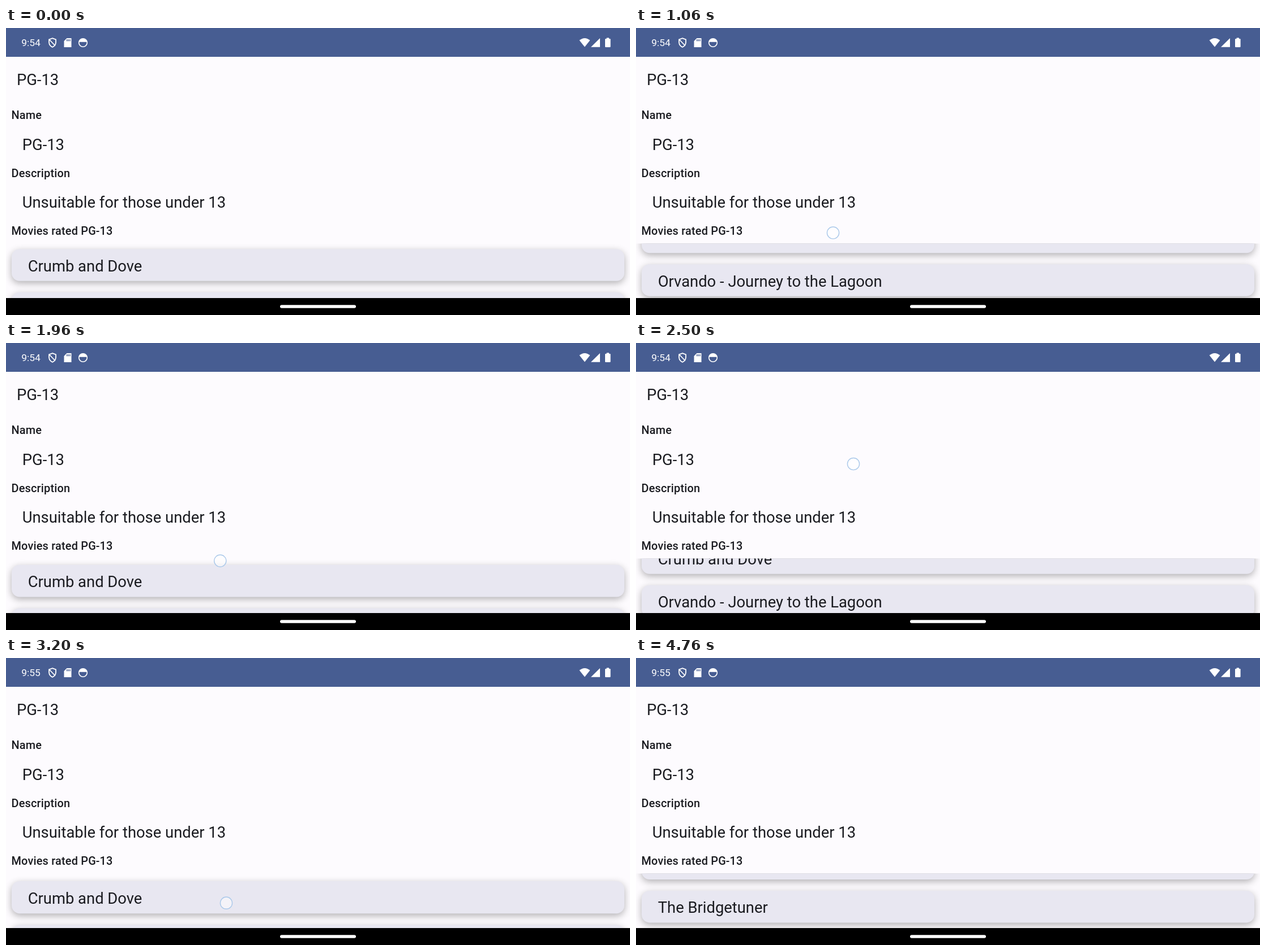
Write an HTML page with a canvas that moves like this. It is 1102 by 508 pixels and loops after 4.8 s.

```html
<!DOCTYPE html>
<html lang="en">
<head>
<meta charset="utf-8">
<title>Rating details</title>
<style>
  html, body { margin: 0; width: 100%; height: 100%; overflow: hidden; background: #fdfbfe; }
  canvas { display: block; width: 1102px; height: 508px; }
</style>
</head>
<body>
<canvas id="stage"></canvas>
<script>
const W = 1102, H = 508, LOOP = 4800;
const canvas = document.getElementById('stage');
const ctx = canvas.getContext('2d');
const dpr = window.devicePixelRatio || 1;
canvas.width = W * dpr;
canvas.height = H * dpr;

const INK = '#1a1b20', PAPER = '#fdfbfe', BAR = '#475d92', CARD = '#e8e7f1';
const LIST = { top: 381.4, bottom: 478 };
const ROW = { x: 10, w: 1082, h: 56.4, pitch: 76.3, top: 391.4 };
const MAX_SCROLL = 132;
const PRESS = 700, RELEASE = 4230, CLOCK_TICK = 2630;
const MOVIES = ['Crumb and Dove', 'Orvando - Journey to the Lagoon', 'The Bridgetuner'];

// Finger path: time, x, y
const PATH = [
  [700, 338, 432], [900, 342, 408], [1060, 348, 363], [1200, 353, 280],
  [1480, 364, 79], [1560, 366, 97], [1730, 371, 193], [1950, 378, 380],
  [2200, 383, 440], [2300, 384, 436], [2500, 384, 215], [2640, 386, 120],
  [2760, 387, 101], [2860, 387, 101], [3030, 389, 250], [3200, 389, 433],
  [3330, 389, 446], [3400, 389, 442], [3730, 389, 270], [3900, 389, 141],
  [4000, 389, 103], [4230, 389, 103]
];

// Drag legs: scroll = anchor - y; low/high weigh the pull past each end
const LEGS = [
  { end: 1480, anchor: 412, low: 1, high: 1 },
  { end: 2230, anchor: 312, low: 1, high: 2 },
  { end: 2810, anchor: 253, low: 0.68, high: 1 },
  { end: 3330, anchor: 243, low: 1, high: 2 },
  { end: Infinity, anchor: 340, low: 1.9, high: 1 }
];

const clamp = (v, lo, hi) => Math.min(hi, Math.max(lo, v));

// Slope at a path point, flat at turning points
function slope(i, k) {
  const a = PATH[i - 1], b = PATH[i], c = PATH[i + 1];
  if (!a || !c || (b[k] - a[k]) * (c[k] - b[k]) <= 0) return 0;
  return (c[k] - a[k]) / (c[0] - a[0]);
}

function along(t, k) {
  let i = 0;
  while (i < PATH.length - 2 && t > PATH[i + 1][0]) i++;
  const a = PATH[i], b = PATH[i + 1], d = b[0] - a[0];
  const u = clamp((t - a[0]) / d, 0, 1), v = 1 - u;
  return v * v * (1 + 2 * u) * a[k] + u * u * (3 - 2 * u) * b[k]
       + d * u * v * (v * slope(i, k) - u * slope(i + 1, k));
}

function listState(t) {
  if (t < PRESS) return { scroll: 0, pull: 0 };
  const leg = LEGS.find(l => t < l.end);
  const raw = leg.anchor - along(t, 2);
  const scroll = clamp(raw, 0, MAX_SCROLL);
  const over = raw - scroll;
  let pull = over * (over > 0 ? leg.high : leg.low) * 0.0185;
  if (t > RELEASE) pull *= Math.exp((RELEASE - t) / 120);
  return { scroll, pull };
}

function text(str, x, y, size, color = INK, weight = 400, spacing = 0) {
  ctx.font = `${weight} ${size}px Roboto, sans-serif`;
  ctx.letterSpacing = spacing + 'px';
  ctx.fillStyle = color;
  ctx.fillText(str, x, y);
}
const body = (str, x, y) => text(str, x, y, 27.4);
const label = (str, y) => text(str, 9.5, y, 19.9, INK, 500, 0.18);

function rounded(x, y, w, h, r) {
  ctx.beginPath();
  ctx.roundRect(x, y, w, h, r);
  ctx.fill();
}

function poly(...pts) {
  ctx.beginPath();
  pts.forEach(([x, y]) => ctx.lineTo(x, y));
  ctx.closePath();
  ctx.fill();
}

function statusBar(t) {
  ctx.fillStyle = BAR;
  ctx.fillRect(0, 0, W, 51);
  text(t < CLOCK_TICK ? '9:54' : '9:55', 27.3, 32, 17.4, '#fff');
  ctx.strokeStyle = ctx.fillStyle = '#fff';
  ctx.lineWidth = 1.8;

  // Shield
  ctx.beginPath();
  ctx.moveTo(82, 18.2);
  ctx.lineTo(88, 20.4);
  ctx.lineTo(88, 25.5);
  ctx.quadraticCurveTo(87.5, 31.5, 82, 33.8);
  ctx.quadraticCurveTo(76.5, 31.5, 76, 25.5);
  ctx.lineTo(76, 20.4);
  ctx.closePath();
  ctx.moveTo(76, 20);
  ctx.lineTo(87, 31.5);
  ctx.stroke();

  // Memory card
  poly([107.5, 18], [115.5, 18], [115.5, 34], [102.5, 34], [102.5, 23]);
  ctx.fillStyle = BAR;
  for (let i = 0; i < 3; i++) ctx.fillRect(107 + i * 2.6, 20, 1.4, 3.4);

  // Ring with a filled cap
  ctx.fillStyle = '#fff';
  ctx.lineWidth = 1.6;
  ctx.beginPath();
  ctx.arc(136, 26, 7.3, 0, 7);
  ctx.stroke();
  ctx.beginPath();
  ctx.arc(136, 26, 7.3, Math.PI * 1.06, Math.PI * 1.94);
  ctx.fill();

  // Wi-Fi, signal, battery
  ctx.beginPath();
  ctx.moveTo(1022, 33.5);
  ctx.lineTo(1012.6, 21.8);
  ctx.quadraticCurveTo(1022, 14.2, 1031.4, 21.8);
  ctx.closePath();
  ctx.fill();
  poly([1049, 18], [1049, 33.8], [1033, 33.8]);
  rounded(1058, 19, 9.6, 15, 1.2);
  ctx.fillRect(1060.6, 17.4, 4.4, 2.2);
}

function card(i, y) {
  ctx.save();
  ctx.fillStyle = CARD;
  ctx.shadowColor = 'rgba(0,0,0,0.3)';
  ctx.shadowBlur = 13 * dpr;
  ctx.shadowOffsetY = 4 * dpr;
  rounded(ROW.x, y, ROW.w, ROW.h, 14);
  ctx.restore();
  body(MOVIES[i], 38.7, y + 39.4);
}

function movieList(t) {
  const { scroll, pull } = listState(t);
  const edge = pull > 0 ? LIST.bottom : LIST.top;
  ctx.save();
  ctx.beginPath();
  ctx.rect(0, LIST.top, W, LIST.bottom - LIST.top);
  ctx.clip();
  ctx.translate(0, edge - pull);
  ctx.scale(1, 1 + Math.abs(pull) * 0.004);
  ctx.translate(0, -edge);
  MOVIES.forEach((_, i) => card(i, ROW.top + i * ROW.pitch - scroll));
  ctx.restore();
}

function finger(t) {
  if (t < PRESS || t >= RELEASE) return;
  ctx.beginPath();
  ctx.arc(along(t, 1), along(t, 2), 10.6, 0, 7);
  ctx.fillStyle = 'rgba(255,255,255,0.5)';
  ctx.fill();
  ctx.strokeStyle = '#abc9ea';
  ctx.lineWidth = 1.4;
  ctx.stroke();
}

function draw(t) {
  ctx.setTransform(dpr, 0, 0, dpr, 0, 0);
  ctx.fillStyle = PAPER;
  ctx.fillRect(0, 0, W, H);
  statusBar(t);
  body('PG-13', 18.9, 101.3);
  label('Name', 161);
  body('PG-13', 28.7, 215.6);
  label('Description', 263.8);
  body('Unsuitable for those under 13', 28.7, 318.3);
  label('Movies rated PG-13', 366.4);
  movieList(t);
  ctx.fillStyle = '#000';
  ctx.fillRect(0, LIST.bottom, W, H - LIST.bottom);
  ctx.fillStyle = '#fff';
  rounded(484, 490.3, 134, 5.4, 2.7);
  finger(t);
}

const start = performance.now();
function tick() {
  draw((performance.now() - start) % LOOP);
  requestAnimationFrame(tick);
}
tick();
</script>
</body>
</html>
```
